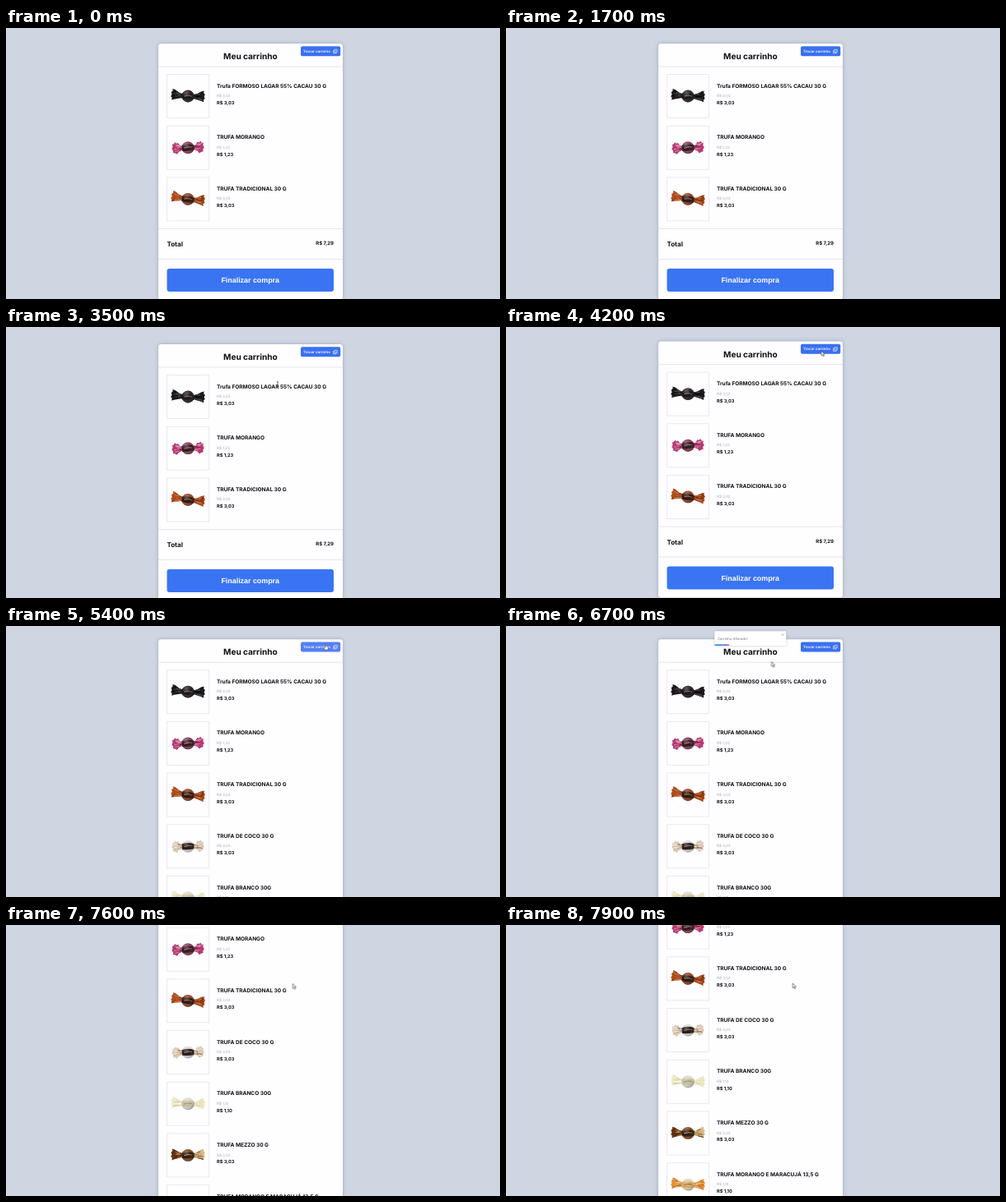
An HTML page for the animation above (8 s loop, 600 by 330 pixels).

```html
<!DOCTYPE html>
<html lang="pt-BR">
<head>
<meta charset="utf-8">
<title>Meu carrinho</title>
<style>
html, body { margin: 0; width: 100%; height: 100%; overflow: hidden; background: #cfd6e2; }
svg { display: block; width: 600px; height: 330px; }
text { font-family: Inter, "Open Sans", sans-serif; text-rendering: geometricPrecision; }
.card { fill: #fefdff; filter: drop-shadow(0 0 2.4px rgba(60, 72, 105, .33)); }
.line { stroke: #e4e3ea; stroke-width: .9; }
.toast { fill: #fff; filter: drop-shadow(0 .5px 1.6px rgba(0, 0, 0, .22)); }
.bar { transform-box: fill-box; transform-origin: 0 50%; }
.hide { visibility: hidden; }
</style>
</head>
<body>
<svg id="stage" viewBox="0 0 600 330">
  <defs>
    <linearGradient id="rainbow">
      <stop offset="0" stop-color="#3d9bd8"/>
      <stop offset=".3" stop-color="#2379f2"/>
      <stop offset=".55" stop-color="#3f8be2"/>
      <stop offset=".78" stop-color="#6a62cf"/>
      <stop offset="1" stop-color="#e0627f"/>
    </linearGradient>
    <radialGradient id="gloss" cx=".36" cy=".28" r=".75">
      <stop offset="0" stop-color="#fff" stop-opacity=".3"/>
      <stop offset=".5" stop-color="#fff" stop-opacity="0"/>
      <stop offset="1" stop-color="#000" stop-opacity=".3"/>
    </radialGradient>
  </defs>
  <rect width="600" height="330" fill="#cfd6e2"/>
  <g id="page"></g>
  <g id="toast" class="hide">
    <rect class="toast" x="253.3" y="6.3" width="87" height="17.6" rx="1"/>
    <text x="257" y="16.5" font-size="4.25" fill="#757575">Carrinho Alterado!</text>
    <path d="M335 9.4l2.4 2.4m0-2.4l-2.4 2.4" stroke="#8e8e93" stroke-width=".6"/>
    <rect class="bar" id="bar" x="253.3" y="22.3" width="87" height="1.6" fill="url(#rainbow)"/>
  </g>
  <g id="cursor" class="hide">
    <path id="beam" d="M-1.2 -2.8H1.2M0 -2.8V2.8M-1.2 2.8H1.2" stroke="#333" stroke-width=".7" fill="none"/>
    <path id="arrow" d="M0 0V5.7L1.4 4.5L2.4 6.7L3.4 6.2L2.4 4.1H4.2Z" fill="#fff" stroke="#333" stroke-width=".6"/>
    <path id="hand" d="M-.5 .4Q0 -.4 .6 .4V2.4L3 3Q3.6 3.3 3.4 4.2L2.8 6.6H-.3L-2 4.2Q-1.8 3.2 -.5 4Z" fill="#fff" stroke="#333" stroke-width=".5"/>
  </g>
</svg>
<script>
const LOOP = 8000, PITCH = 62.7, SWAP = 5400;
const $ = id => document.getElementById(id);

// name, price, wing shape, left wing, right wing, fold light, fold dark, body, band, label, tilt
const items = [
  ['Trufa FORMOSO LAGAR 55% CACAU 30 G', '3,03', 'fan', '#1b191c', '#1b191c', '#56525a', '#050506', '#2b2225', '#171315', '#a0766c', 4],
  ['TRUFA MORANGO', '1,23', 'bow', '#b83a72', '#b83a72', '#eeacc9', '#7d1f4a', '#8a3c58', '#2c171b', '#c58a8d', -3],
  ['TRUFA TRADICIONAL 30 G', '3,03', 'fan', '#ad4c1d', '#a0441b', '#dd8a4c', '#64240c', '#8f4326', '#28140f', '#c7784c', 8],
  ['TRUFA DE COCO 30 G', '3,03', 'bow', '#d9cab6', '#d9cab6', '#f6efe4', '#94683f', '#dedad8', '#251816', '#a99a90', -2],
  ['TRUFA BRANCO 30G', '1,10', 'fan', '#eee9cb', '#ece6c0', '#faf8e8', '#cfc595', '#dcdac9', '#c4bea0', '#776e48', 3],
  ['TRUFA MEZZO 30 G', '3,03', 'fan', '#633314', '#d6bd8a', '#c89c5c', '#4a2410', '#7d4a22', '#2c180d', '#d4a757', 0],
  ['TRUFA MORANGO E MARACUJÁ 13,5 G', '1,10', 'fan', '#e0913d', '#de8c36', '#f8d294', '#a9551a', '#e8d2a6', '#d4a866', '#7b421d', 3]
];

const wings = {
  fan: 'M6 -2.2L11 -3.8L16 -7L19.2 -7.8L18.8 -5.4L20.6 -3.4L19.6 -.8L20.8 1.6L19.2 3.2L19.6 6L16.5 4.8L11.5 3.6L6 2.4Z',
  bow: 'M6 -1.6L10 -3.4L11.6 -6.4L14 -5.8L15.4 -7.4L17 -5.2L19 -4.6L18.4 -1.8L19.8 .6L18 3L18.4 5.4L15.6 6L13.6 7.4L11.4 4.6L6 2.2Z'
};

function random(seed) {
  return () => (seed = seed * 16807 % 2147483647) / 2147483647;
}

const text = (x, y, size, str, weight = 700, fill = '#111', extra = '') =>
  `<text x="${x}" y="${y}" font-size="${size}" font-weight="${weight}" fill="${fill}" ${extra}>${str}</text>`;
const line = y => `<path class="line" d="M185 ${y}H409"/>`;

// Creases fan out from the knot beside the body
function folds(rnd, color) {
  let d = '';
  for (let i = 0; i < 6; i++) {
    const slope = rnd() * .58 - .3, from = 7 + rnd() * 6, to = from + 3 + rnd() * 4;
    d += `M${from} ${from * slope}L${to} ${to * slope}`;
  }
  return `<path d="${d}" stroke="${color}" stroke-width=".9" fill="none" opacity=".75"/>`;
}

const wing = (shape, fill, light, dark, flip, rnd) =>
  `<g transform="scale(${flip} 1)"><path d="${wings[shape]}" fill="${fill}"/>${folds(rnd, dark)}${folds(rnd, light)}</g>`;

function candy([, , shape, left, right, light, dark, body, band, label, tilt], i) {
  const rnd = random(97 + i * 1301);
  return `<g transform="translate(221 64) rotate(${tilt})">
    ${wing(shape, left, light, dark, -1, rnd)}${wing(shape, right, light, dark, 1, rnd)}
    <ellipse rx="7.8" ry="7.4" fill="${body}"/>
    <path d="M-7.4 -3Q0 -5.6 7.6 -2.6L7.2 3.2Q0 5 -7.2 3.6Z" fill="${band}"/>
    <path d="M-4.4 .4Q0 -1.4 4.6 -.4" stroke="${label}" stroke-width="1.1" stroke-dasharray="1.4 .6" fill="none"/>
    <ellipse rx="7.8" ry="7.4" fill="url(#gloss)"/>
  </g>`;
}

function row(item, i) {
  return `<g transform="translate(0 ${i * PITCH})">
    <rect x="195.5" y="37.5" width="51" height="53" fill="#fefdff" stroke="#e9e7ee" stroke-width=".9"/>
    ${candy(item, i)}
    ${text(256, 53.5, 6.5, item[0])}
    ${text(256, 65.1, 4.5, 'R$ ' + item[1], 400, '#abaab2')}
    ${text(256, 74, 5.65, 'R$ ' + item[1])}
  </g>`;
}

const rows = items.map(row);
$('page').innerHTML = `
  <g id="short">
    <rect class="card" x="185" width="224" height="312" rx="3.5"/>
    ${line(225.5)}${line(262.5)}
    ${text(195.5, 247.2, 8, 'Total')}
    ${text(398, 245.4, 6, 'R$ 7,29', 700, '#111', 'text-anchor="end"')}
    <rect x="195.5" y="274" width="202.5" height="28" rx="3" fill="#3a74f2"/>
    ${text(296.7, 291.1, 8.9, 'Finalizar compra', 700, '#fff',
      'text-anchor="middle" style="font-family:\'Liberation Sans\',Arial,sans-serif"')}
  </g>
  <g id="long" class="hide">
    <rect class="card" x="185" width="224" height="640" rx="3.5"/>
    ${rows.slice(3).join('')}
  </g>
  ${text(296.8, 19.1, 10.05, 'Meu carrinho', 700, '#111', 'text-anchor="middle"')}
  ${line(28)}
  ${rows.slice(0, 3).join('')}
  <rect id="swap" x="358" y="3.3" width="48.2" height="12" rx="2" fill="#3a70f0"/>
  ${text(361, 10.8, 4.4, 'Trocar carrinho', 600, '#fff')}
  <path d="M398.8 7.1h3.6v3.4h-3.6zM398.8 8.4h-1.3v3.5h3.6v-1.4" fill="#fff" fill-opacity=".25" stroke="#fff" stroke-opacity=".85" stroke-width=".5"/>`;

// steps: [ms, value, easing]
function play(el, prop, steps, easing = 'linear') {
  const keys = steps.map(([ms, value, ease]) => ({ offset: ms / LOOP, [prop]: value, easing: ease || easing }));
  if (keys[0].offset > 0) keys.unshift({ ...keys[0], offset: 0 });
  const last = keys[keys.length - 1];
  if (last.offset < 1) keys.push({ ...last, offset: 1 });
  el.animate(keys, { duration: LOOP, iterations: Infinity });
}
const moveY = (el, steps) =>
  play(el, 'transform', steps.map(([ms, y, ease]) => [ms, `translate(0px, ${y}px)`, ease]));
const show = (el, ...spans) =>
  play(el, 'visibility', [[0, spans[0][0] ? 'hidden' : 'visible'],
    ...spans.flatMap(([a, b]) => [...(a ? [[a, 'visible']] : []), ...(b < LOOP ? [[b, 'hidden']] : [])])], 'step-end');

moveY($('page'), [
  [0, 19], [1950, 19], [2200, 15.6], [2450, 16], [2600, 17.6], [2800, 20], [3000, 17.5], [3200, 16.2],
  [3500, 21], [3800, 21], [4100, 18], [4500, 16.2], [7000, 16.2], [7100, 7], [7200, -22],
  [7300, -53.3], [7450, -78], [7600, -97], [7900, -124], [8000, -127]
]);
show($('short'), [0, SWAP]);
show($('long'), [SWAP, LOOP]);
play($('swap'), 'fill', [[0, '#3a70f0'], [4600, '#3a70f0'], [4700, '#557ff3'], [5900, '#557ff3'], [6000, '#3a70f0']]);

// Toast: bounces down, counts down, bounces out
const IN = 5466, OUT = 6966, PX = .272, SPAN = 700;
const drop = 'cubic-bezier(.215,.61,.355,1)';
const at = (start, list) => list.map(([p, y, ease]) => [start + p * SPAN, y * PX, ease]);
moveY($('toast'), [
  ...at(IN, [[0, -3000, drop], [.6, 25, drop], [.75, -10, drop], [.9, 5, drop], [1, 0]]),
  ...at(OUT, [[0, 0, 'ease'], [.2, -10, 'ease'], [.4, 20], [.45, 20, 'ease'], [1, -2000]])
]);
show($('toast'), [IN, OUT + SPAN]);
play($('bar'), 'transform', [[IN, 'scaleX(1)'], [OUT + 50, 'scaleX(0)']]);

play($('cursor'), 'transform', [
  [0, 330, 69.5], [3800, 330, 69.5], [4100, 370, 40], [4350, 402, 13], [4600, 390, 23], [4700, 388, 22.5],
  [5700, 388, 22.5], [6000, 374, 29], [6500, 325, 42], [6700, 322.5, 43.5], [6900, 332, 55],
  [7200, 348, 72], [7300, 348.2, 72], [7900, 348.2, 71]
].map(([ms, x, y]) => [ms, `translate(${x}px, ${y}px)`]));
show($('beam'), [2000, 3850]);
show($('arrow'), [3850, 4600], [6000, LOOP]);
show($('hand'), [4600, 6000]);
</script>
</body>
</html>
```
